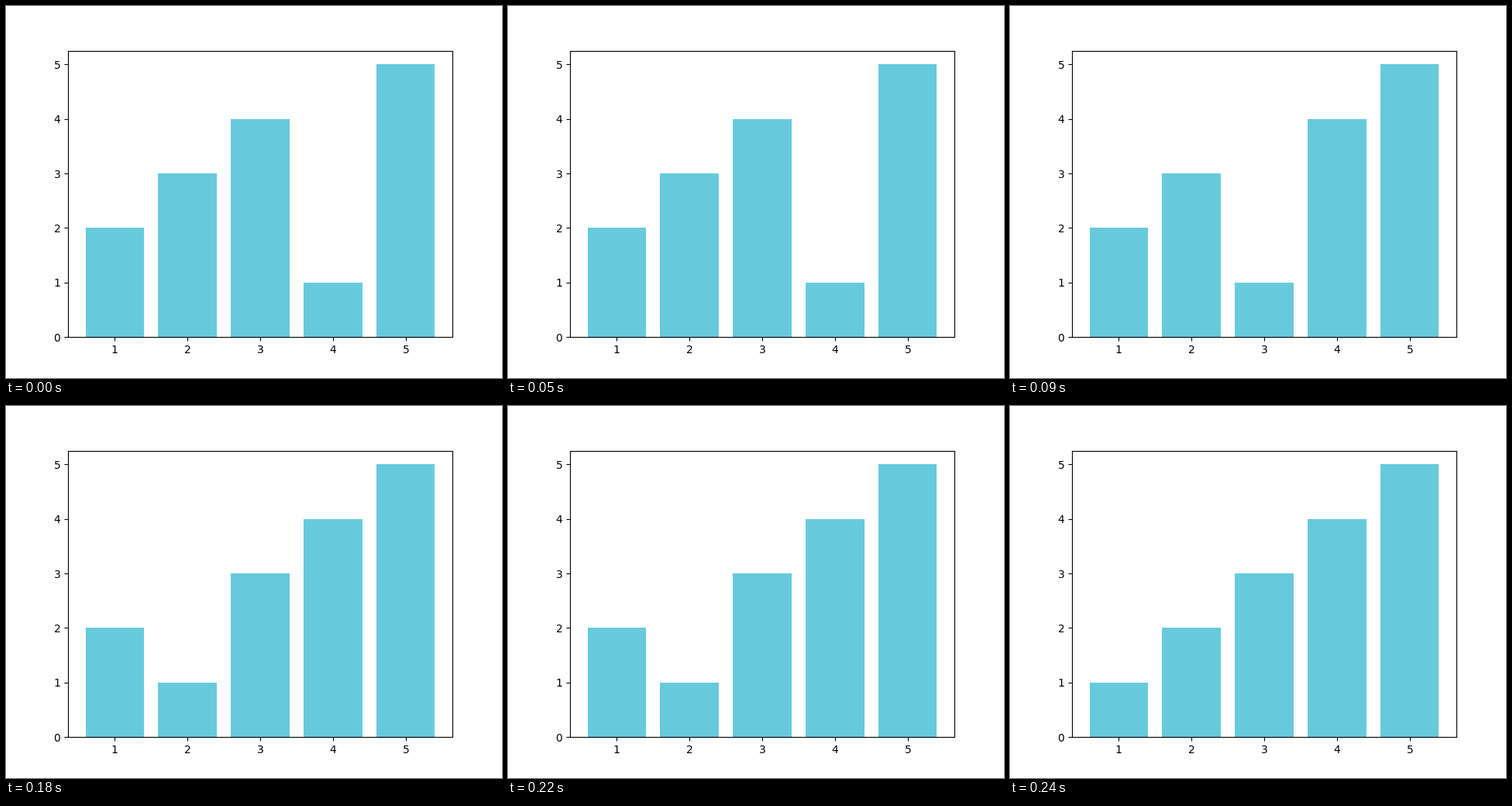
Recreate the animation shown at these times as a matplotlib script. Size 640 px wide and 480 px high, loop 300 ms.

```python
import matplotlib.pyplot as plt
from matplotlib.animation import FuncAnimation

TICK = 30                      # ms per animation frame
HOLDS = [90, 90, 60, 60]       # ms each sorting state stays on screen
START = [2, 3, 4, 1, 5]


def insertion_states(values):
    """Return the list after every swap of an insertion sort."""
    values = list(values)
    states = [values[:]]
    for i in range(1, len(values)):
        j = i
        while j > 0 and values[j - 1] > values[j]:
            values[j - 1], values[j] = values[j], values[j - 1]
            states.append(values[:])
            j -= 1
    return states


timeline = [state
            for state, hold in zip(insertion_states(START), HOLDS)
            for _ in range(hold // TICK)]

fig, ax = plt.subplots(figsize=(6.4, 4.8), dpi=100)
bars = ax.bar(range(1, len(START) + 1), START, color="#66cadc")


def update(frame):
    for bar, height in zip(bars, timeline[frame]):
        bar.set_height(height)
    return list(bars)


anim = FuncAnimation(fig, update, frames=len(timeline), interval=TICK,
                     repeat=True, repeat_delay=0, blit=False)
plt.show()
```
